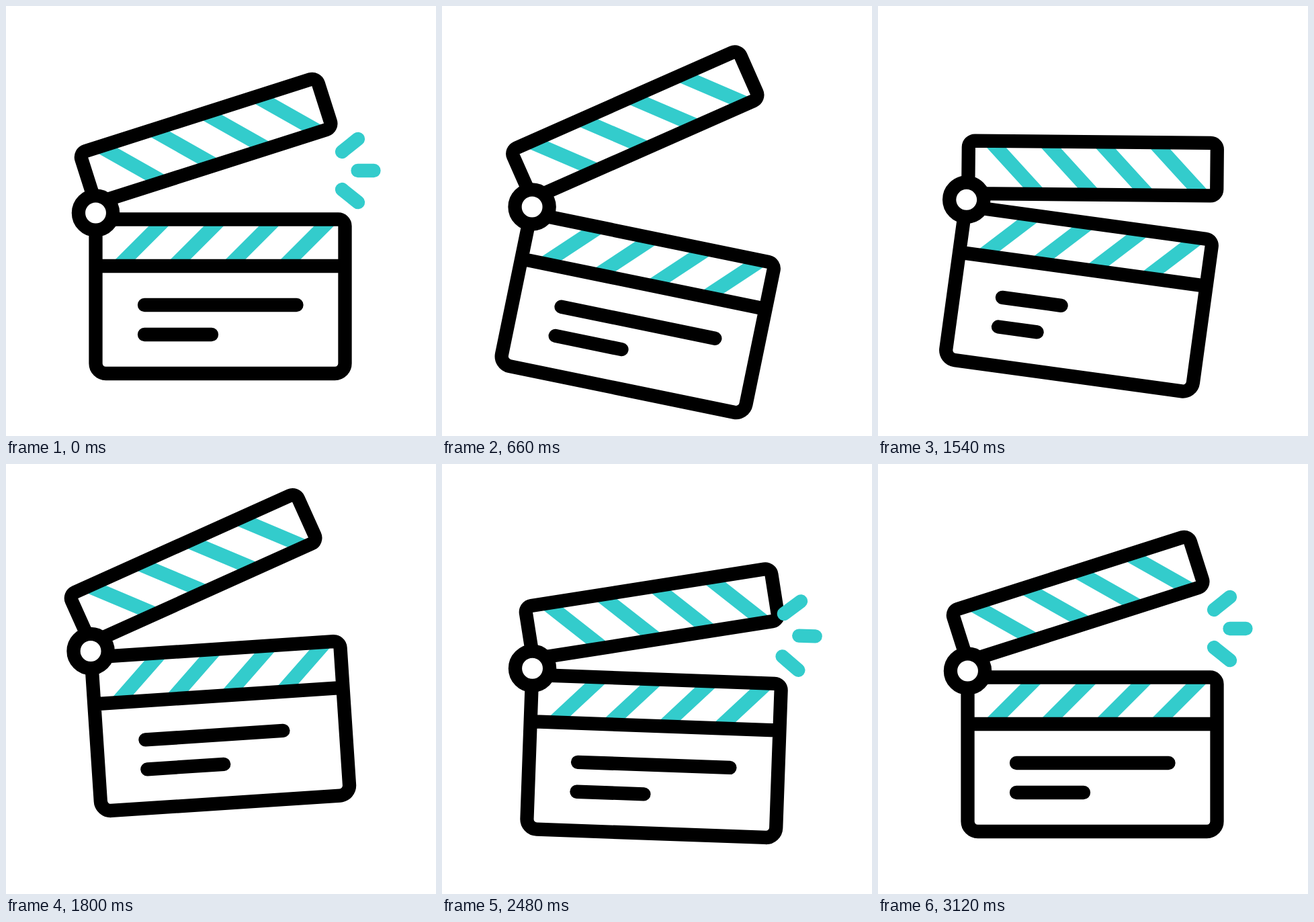
An HTML page for the animation above (3.6 s loop, 640 px wide and 640 px high).

```html
<!DOCTYPE html>
<html lang="en">
<head>
<meta charset="utf-8">
<title>Clapperboard</title>
<style>
  html, body { margin: 0; width: 100%; height: 100%; overflow: hidden; background: #fff; }
  svg { display: block; width: 100%; height: 100%; }
  path, rect, circle { fill: none; stroke: #000; stroke-width: 20.3; }
  .round { stroke-linecap: round; }
  .tint { fill: #33cccc; stroke: none; }
  #sparks { stroke: #33cccc; }
  #hinge { fill: #fff; }
</style>
</head>
<body>
<svg viewBox="0 0 640 640">
  <!-- Everything is placed relative to the hinge -->
  <g id="board">
    <path class="tint" id="boardStripes"/>
    <path d="M0 0V224a15 15 0 0 0 15 15H356a15 15 0 0 0 15-15V19.5a10 10 0 0 0-10-10H0M0 79H371"/>
    <path class="round" id="lines"/>
  </g>
  <g id="arm">
    <path class="tint" id="armStripes"/>
    <rect x="10" y="-88.5" width="370" height="78.5" rx="9.5"/>
  </g>
  <circle id="hinge" r="25.6"/>
  <path class="round" id="sparks"/>
</svg>
<script>
const LOOP = 3600;
const $ = id => document.getElementById(id);
const set = (id, name, value) => $(id).setAttribute(name, value);
const clamp = u => Math.min(1, Math.max(0, u));
const smooth = u => u * u * (3 - 2 * u);
const backOut = (u, s) => 1 + (s + 1) * (u - 1) ** 3 + s * (u - 1) ** 2;

// Extreme poses: hinge x, hinge y, board angle, arm angle
const rest = [133.5, 308, 0, -17.7];
const shut = [135, 294, 14.5, 14.9];
const poses = [
  [0, rest],
  [566, [134, 299.5, 11.3, -28]],
  [1060, shut],
  [1300, shut],
  [1930, [125, 276.6, -6, -29]],
  [2310, [135.7, 304.7, 3.7, -1.5]],
  [2730, [132.5, 303.5, -0.8, -22]],
  [3120, rest],
  [LOOP, rest]
];

function poseAt(t) {
  const i = poses.findIndex(([time]) => time > t);
  const [t0, from] = poses[i - 1], [t1, to] = poses[i];
  const u = smooth((t - t0) / (t1 - t0));
  return from.map((v, k) => v + (to[k] - v) * u);
}

function stripes(x1, y1, x2, y2, width, pitch) {
  let d = '';
  for (let i = 0; i < 4; i++) {
    const x = i * pitch;
    d += `M${x1 + x} ${y1}L${x2 + x} ${y2}h${width}L${x1 + width + x} ${y1}z`;
  }
  return d;
}
set('boardStripes', 'd', stripes(27.5, 71, 81.5, 17, 29.5, 82));
set('armStripes', 'd', stripes(35.2, -80.5, 93.3, -18, 29, 81.4));

// Text lines shrink to nothing and spring back, mirrored in time
function bar(t, y, full, span, spring) {
  const length = full * backOut(clamp(Math.abs(t - 1430) / span), spring);
  return length > 0.5 ? `M72.5 ${y}h${length}` : '';
}

function sparks(t) {
  const u = clamp(t < 1000 ? 1 - t / 460 : (t - 2085) / 640);
  if (!u) return '';
  const near = 5 * Math.sin(Math.PI * u), far = 24 * backOut(u, 3);
  return [-1, 0, 1].map(side => {
    const x = side ? 366.5 : 390, y = -63 + 28 * side, slope = 0.8 * side;
    return `M${x + near} ${y + slope * near}L${x + far} ${y + slope * far}`;
  }).join('');
}

function draw(t) {
  const [x, y, tilt, lift] = poseAt(t);
  const hinge = `translate(${x} ${y})`, board = `${hinge} rotate(${tilt})`;
  // The arm slides a little on its hinge as it turns
  const turn = lift + 13, slideX = -6.3 - 0.1 * turn, slideY = -4.3 + 0.027 * turn * turn;
  set('board', 'transform', board);
  set('sparks', 'transform', board);
  set('hinge', 'transform', hinge);
  set('arm', 'transform', `${hinge} rotate(${lift}) translate(${slideX} ${slideY})`);
  set('lines', 'd', bar(t, 137, 226.5, 1000, 1.06) + bar(t, 181, 100, 820, 2.25));
  set('sparks', 'd', sparks(t));
}

const start = performance.now();
function tick() {
  draw((performance.now() - start) % LOOP);
  requestAnimationFrame(tick);
}
tick();
</script>
</body>
</html>
```
